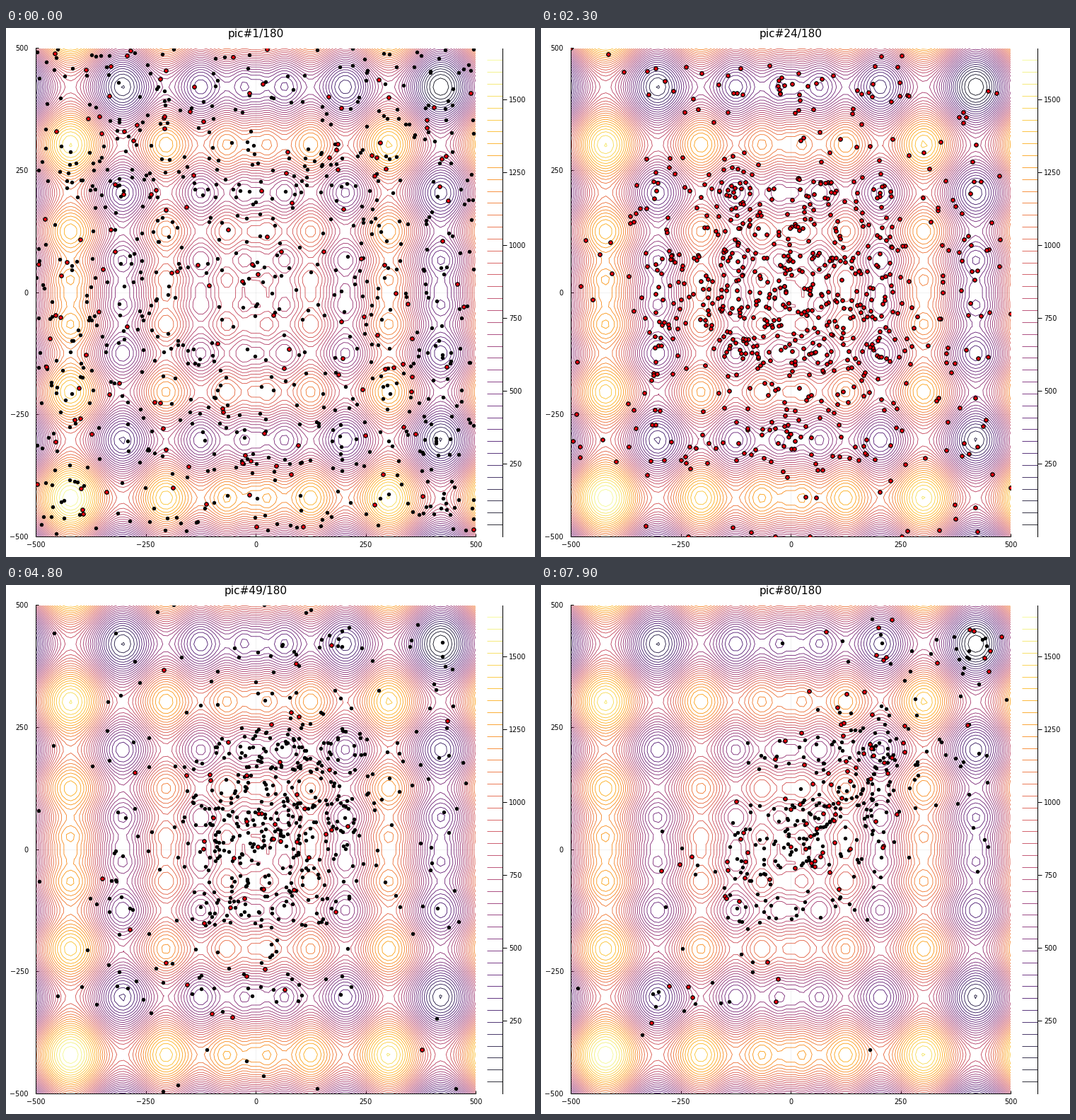
A matplotlib script for the animation above (8000 ms loop, 748 by 748 pixels).

```python
import numpy as np
import matplotlib.pyplot as plt
from matplotlib.animation import FuncAnimation

SIZE, DPI = 748, 100
PX = 72 / DPI
FRAMES, TOTAL = 80, 180
LIMIT, LEVELS = 500, 40
TOP, BOTTOM = 28.5, 719.0

plt.rcParams.update({"font.family": "DejaVu Sans", "font.size": 9.6 * PX,
                     "axes.linewidth": PX})


def schwefel(x, y):
    wave = lambda v: v * np.sin(np.sqrt(np.abs(v)))
    return 2 * 418.9829 - wave(x) - wave(y)


# How the swarm changes: centre and spread along the diagonal, spread across it
KEYS = [0, 14, 23, 42, 55, 67, 79]
CENTRE = [0, 0, 20, 60, 95, 115, 125]
ALONG = [900, 230, 200, 175, 165, 155, 175]
ACROSS = [900, 230, 195, 135, 110, 90, 75]
COUNT = [900, 1100, 830, 670, 610, 500, 420]
RED_KEYS = [0, 14, 22, 27, 37, 44, 55, 79]
RED_SHARE = [0.17, 0.6, 1, 1, 0, 0, 0.22, 0.22]


def log_density(p, t):
    x, y = p
    u = ((x + y) / np.sqrt(2) - np.interp(t, KEYS, CENTRE)) / np.interp(t, KEYS, ALONG)
    v = (y - x) / np.sqrt(2) / np.interp(t, KEYS, ACROSS)
    heat = np.interp(t, [0, 14, 79], [1500, 480, 420])
    return -3 * np.log1p((u * u + v * v) / 4) - schwefel(x, y) / heat


def simulate(sweeps=16):
    rng = np.random.default_rng(12)
    n = max(COUNT)
    pos = rng.uniform(-LIMIT, LIMIT, (2, n))
    path = [pos]
    for t in range(1, FRAMES):
        for _ in range(sweeps):
            reach = np.where(rng.random(n) < 0.12, 180, 15)
            trial = pos + rng.normal(0, 1, (2, n)) * reach
            # Short steps may end on the border, long ones must stay inside
            inside = (np.abs(trial) <= LIMIT).all(axis=0) | (reach < 20)
            trial = np.clip(trial, -LIMIT, LIMIT)
            gain = log_density(trial, t) - log_density(pos, t)
            pos = np.where(inside & (np.log(rng.random(n)) < gain), trial, pos)
        path.append(pos)
    return path, rng.random(n)


def pixel_axes(x0, x1):
    return fig.add_axes([x0 / SIZE, 1 - BOTTOM / SIZE,
                         (x1 - x0) / SIZE, (BOTTOM - TOP) / SIZE])


fig = plt.figure(figsize=(SIZE / DPI, SIZE / DPI), dpi=DPI, facecolor="white")

# Landscape
grid = np.arange(-LIMIT, LIMIT + 1, 10)
z = schwefel(*np.meshgrid(grid, grid))
levels = np.linspace(z.min(), z.max(), LEVELS + 2)[1:-1]
style = dict(cmap="inferno", norm=plt.Normalize(z.min(), z.max()))

ax = pixel_axes(42, 664)
ax.contour(grid, grid, z, levels, linewidths=0.8 * PX, **style)
ax.set(xlim=(-LIMIT, LIMIT), ylim=(-LIMIT, LIMIT))
ticks = np.arange(-LIMIT, LIMIT + 1, 250)
ax.set_xticks(ticks)
ax.set_yticks(ticks)
ax.tick_params(direction="in", length=4 * PX, width=PX)
ax.tick_params(axis="x", pad=7 * PX)
ax.tick_params(axis="y", pad=10 * PX)
ax.grid(color="black", alpha=0.1, linewidth=0.5 * PX)
ax.spines[["top", "right"]].set_visible(False)

# Colour scale
bar = pixel_axes(680, 702)
bar.hlines(levels, 0, 1, colors=plt.get_cmap("inferno")(style["norm"](levels)),
           linewidth=0.8 * PX)
bar.set(xlim=(0, 1), ylim=(z.min(), z.max()), xticks=[])
bar.patch.set_visible(False)
bar.yaxis.tick_right()
bar.set_yticks(np.arange(250, 1501, 250))
bar.tick_params(length=6 * PX, width=PX, pad=3 * PX)
bar.spines[["top", "bottom", "left"]].set_visible(False)

# Swarm
path, rank = simulate()
black, = ax.plot([], [], "o", color="black", ms=5.4 * PX, mew=0, zorder=5)
red, = ax.plot([], [], "o", mfc="#f0000c", mec="black", ms=5.4 * PX,
               mew=1.3 * PX, zorder=6)
title = fig.text(353 / SIZE, 1 - 13.5 / SIZE, "", fontsize=15.4 * PX,
                 ha="center", va="baseline")


def update(t):
    shown = np.arange(len(rank)) < round(np.interp(t, KEYS, COUNT))
    is_red = rank < np.interp(t, RED_KEYS, RED_SHARE)
    black.set_data(*path[t][:, shown & ~is_red])
    red.set_data(*path[t][:, shown & is_red])
    title.set_text(f"pic#{t + 1}/{TOTAL}")
    return black, red, title


anim = FuncAnimation(fig, update, frames=FRAMES, interval=100,
                     repeat=True, repeat_delay=0)
plt.show()
```
